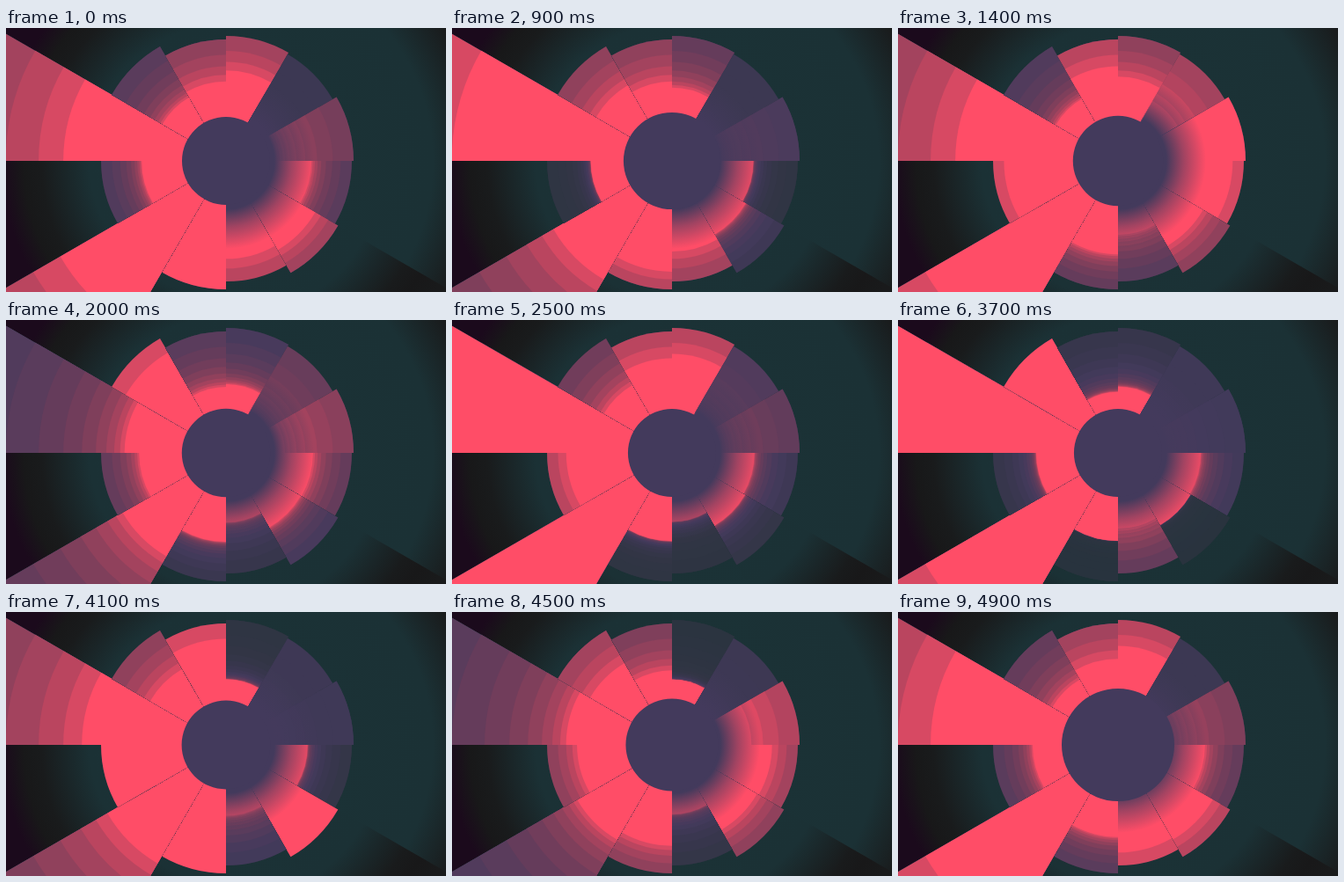
Animation of 500x300 px, one loop 5000 ms. Source, as an HTML page with a canvas:

```html
<!DOCTYPE html>
<html lang="en">
<head>
<meta charset="utf-8">
<title>Radial equalizer</title>
<style>
  html, body { margin: 0; width: 100%; height: 100%; overflow: hidden; background: #1b3135; }
  canvas { display: block; width: 500px; height: 300px; }
</style>
</head>
<body>
<canvas id="stage" width="500" height="300"></canvas>
<script>
const ctx = document.getElementById('stage').getContext('2d');
const CX = 250, CY = 151, STEP = Math.PI / 6;
const LOOP = 5, TICK = 0.1, TICKS = LOOP / TICK;
const FALL = 0.35, COOL = 0.8; // decay of the bars and of their trails, in seconds

// Bursts of ticks (first, last); the picture rests between them.
const bursts = [[0, 2], [4, 7], [9, 11], [13, 16], [18, 21], [23, 25], [27, 30], [32, 49]];

// Bands run clockwise from the top; beats are in seconds.
const band = (base, reach, ...beats) => ({ base, reach, beats });
const bands = [
  band(74, 142, 0.2, 1, 2.3, 4.7),
  band(50, 140, 1),
  band(50, 145, 1.4, 4.2),
  band(92, 143, 1.3, 2.6, 4.2),
  band(95, 147, 1, 4.1, 4.7),
  band(78, 137, 0.6, 3, 4.8),
  band(100, 146, 0, 0.7, 4.1),
  band(110, 300, 0.4, 1.3, 2.5, 3, 3.6, 4.8),
  band(92, 142, 1.3, 2.3, 4.1),
  band(100, 300, 0.8, 1.1, 2.5, 3, 3.7, 4.7),
  band(76, 150, 0.5, 1.9, 2.6, 3.7, 4.2),
  band(68, 138, 0.5, 1.2, 2.3, 4, 4.6)
];

// Heat ramp: cold trail, slate, purple, maroon, pink.
const ramp = [[27, 49, 53], [50, 53, 69], [67, 58, 92], [121, 62, 91], [184, 69, 95], [255, 77, 103]];
const levels = [0, 0.22, 0.33, 0.55, 0.78, 1];

function heat(v) {
  let i = 0;
  while (i < 4 && levels[i + 1] < v) i++;
  const part = (v - levels[i]) / (levels[i + 1] - levels[i]);
  return `rgb(${ramp[i].map((c, n) => Math.round(c + (ramp[i + 1][n] - c) * part))})`;
}

// Strength left from the latest beat; time wraps around the loop.
function pulse(beats, t) {
  const ages = beats.map(beat => (Math.round((t - beat) / TICK) + 2 * TICKS) % TICKS * TICK);
  return Math.exp(-Math.min(...ages) / FALL);
}

const barAt = ({ base, reach, beats }, t) => base + (reach - base) * pulse(beats, t);

function radial(radius, stops) {
  const g = ctx.createRadialGradient(CX, CY, 0, CX, CY, radius);
  for (const [r, color] of stops) g.addColorStop(r / radius, color);
  return g;
}

const night = (from, edge) => radial(from + 100,
  [[0, '#1b3337'], [from, '#1b3135'], [from + 55, '#191b1c'], [from + 75, '#181819'], [from + 100, edge]]);
const leftNight = night(155, '#1b0a1c');
const rightNight = night(235, '#191a1b');
const cornerNight = night(180, '#191a1b');

// Purple haze that swallows the inner ends of the quiet bands.
const haze = radial(100, [[0, 'rgb(67,58,92)'], [55, 'rgb(67,58,92)'],
  [75, 'rgba(67,58,92,.5)'], [100, 'rgba(67,58,92,0)']]);

function sector(i, radius, fill, span = 1) {
  const from = i * STEP - Math.PI / 2;
  ctx.beginPath();
  ctx.moveTo(CX, CY);
  ctx.arc(CX, CY, radius, from, from + span * STEP);
  ctx.fillStyle = fill;
  ctx.fill();
}

// Every past bar stays as a ring that cools with its age.
function drawBand(b, i, t) {
  const floor = i === 1 || i === 2 ? 0.28 : 0.1;
  for (let n = TICKS - 1; n >= 0; n--) {
    const age = n * TICK;
    const warmth = n ? floor + (0.98 - floor) * Math.exp(-age / COOL) : 1;
    sector(i, barAt(b, t - age), heat(warmth));
  }
}

function draw(t) {
  ctx.fillStyle = leftNight;
  ctx.fillRect(0, 0, 250, 300);
  ctx.fillStyle = rightNight;
  ctx.fillRect(250, 0, 250, 300);
  sector(4, 320, cornerNight);
  bands.forEach((b, i) => drawBand(b, i, t));
  sector(1, 100, haze, 5);
  // The hub swells towards the end of the loop.
  const hub = 50 + 12 * pulse([0.6], t) + 14 * (t / 4.9) ** 20;
  sector(0, hub, heat(levels[2]), 12);
}

function hold(tick) {
  const [, last] = bursts.filter(([first]) => first <= tick).pop();
  return Math.min(tick, last);
}

const start = performance.now();
let shown = -1;
function frame() {
  const tick = hold(Math.floor((performance.now() - start) / 100) % TICKS);
  if (tick !== shown) draw(tick * TICK);
  shown = tick;
  requestAnimationFrame(frame);
}
frame();
</script>
</body>
</html>
```
